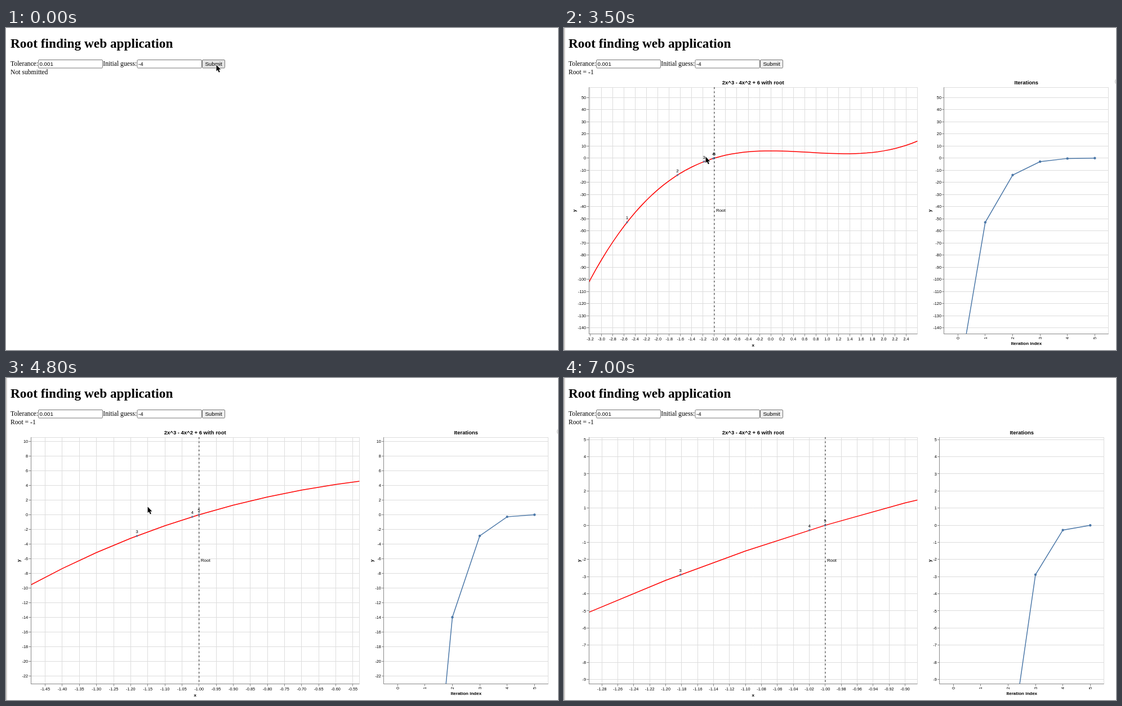
An HTML page with a canvas that plays this animation: 980x571 px, repeating every 7.2 s.

```html
<!DOCTYPE html>
<html lang="en">
<head>
<meta charset="utf-8">
<title>Root finding</title>
<style>
  html, body { margin: 0; width: 100%; height: 100%; overflow: hidden; background: #fff; }
  canvas { display: block; }
</style>
</head>
<body>
<canvas id="stage" width="980" height="571"></canvas>
<script>
const ctx = document.getElementById('stage').getContext('2d');
const LOOP = 7200, UNIT = 0.7293; // UNIT: page zoom
const SANS = '"Liberation Sans", Arial, sans-serif';
const SERIF = '"Liberation Serif", "Times New Roman", serif';
const BLUE = '#4c78a8', LABEL = 10 * UNIT;
const TOP = 105.1, HEIGHT = 437.8, BOTTOM = TOP + HEIGHT;
const LEFT = 44, WIDTH = 583.4, WIDTH2 = 291.7;
// Fixed point of the zoom: on the page and in plot units
const PIVOT = { x: 251.88, y: 228.46, px: -1.1497, py: 1.075 };

const f = x => 2 * x ** 3 - 4 * x ** 2 + 6;
const slope = x => 6 * x ** 2 - 8 * x;
const curve = Array.from({ length: 80 }, (_, i) => (i - 40) / 10).map(x => [x, f(x)]);
const guesses = [-4];
for (let i = 0; i < 5; i++) {
  const x = guesses[i];
  guesses.push(x - f(x) / slope(x));
}

// [time, wheel notches so far]
const wheel = [[3300, 1], [3400, 2], [3500, 3], [3600, 4], [4000, 6], [4100, 8], [4200, 10],
  [4300, 13], [4400, 15], [4500, 17], [4600, 18], [4700, 19], [4800, 20], [5000, 21],
  [5100, 22], [5200, 24], [5300, 25], [5700, 26], [5800, 27], [5900, 28]];
// [time, x, y]
const pointer = [[0, 373.5, 65.5], [1200, 373.5, 65.5], [1300, 360, 78], [1500, 311.8, 92.5],
  [1700, 210, 116], [1900, 100, 90], [2000, 52, 64], [2100, 46, 58], [2400, 50, 110],
  [2600, 110, 200], [2800, 175, 256], [2900, 190, 260], [3000, 225, 245],
  [3100, 251.5, 228.3], [6300, 251.5, 228.3], [6400, 190, 110], [6500, 121, 3], [6700, 121, 3]];

function text(str, x, y, size, { align = 'center', bold = false, family = SANS, turn = 0 } = {}) {
  ctx.save();
  ctx.translate(x, y);
  ctx.rotate(turn);
  ctx.font = `${bold ? 'bold ' : ''}${size}px ${family}`;
  ctx.textAlign = align;
  ctx.fillStyle = '#000';
  ctx.fillText(str, 0, size * 0.36);
  ctx.restore();
}

function path(points, color, width) {
  ctx.beginPath();
  points.forEach(([x, y]) => ctx.lineTo(x, y));
  ctx.strokeStyle = color;
  ctx.lineWidth = width;
  ctx.stroke();
}

const snap = v => Math.floor(v) + 0.5;
const hLine = (x0, x1, y, color) => path([[x0, snap(y)], [x1, snap(y)]], color, 1);
const vLine = (x, y0, y1, color) => path([[snap(x), y0], [snap(x), y1]], color, 1);

function dot(x, y, r) {
  ctx.beginPath();
  ctx.arc(x, y, r, 0, 2 * Math.PI);
  ctx.fillStyle = BLUE;
  ctx.fill();
}

function ticks(lo, hi, count) {
  const raw = (hi - lo) / count;
  const power = Math.floor(Math.log10(raw)), base = 10 ** power, err = raw / base;
  const factor = err >= Math.sqrt(50) ? 10 : err >= Math.sqrt(10) ? 5 : err >= Math.SQRT2 ? 2 : 1;
  const step = factor * base;
  const digits = Math.max(0, factor === 10 ? -power - 1 : -power);
  const list = [];
  for (let i = Math.ceil(lo / step - 1e-3); i <= hi / step + 1e-3; i++) {
    list.push({ value: i * step, label: (i === 0 ? 0 : i * step).toFixed(digits) });
  }
  return list;
}

function clipped(x, width, draw) {
  ctx.save();
  ctx.beginPath();
  ctx.rect(x, TOP, width, HEIGHT);
  ctx.clip();
  draw();
  ctx.restore();
}

function frame(x, width, yTicks, toY) {
  hLine(x, x + width, TOP, '#ddd');
  vLine(x + width, TOP, BOTTOM, '#ddd');
  yTicks.forEach(t => hLine(x, x + width, toY(t.value), '#ddd'));
}

function axes(x, width, yTicks, toY) {
  vLine(x, TOP, BOTTOM, '#888');
  hLine(x, x + width, BOTTOM, '#888');
  yTicks.forEach(t => {
    const y = toY(t.value);
    hLine(x - 3.6, x, y, '#888');
    text(t.label, x - 5, y, LABEL, { align: 'right' });
  });
}

function labelWidth(list) {
  ctx.font = `${LABEL}px ${SANS}`;
  return Math.max(...list.map(t => ctx.measureText(t.label).width));
}

const titleY = (list, toY) => Math.min(97, toY(list[list.length - 1].value) - 12);

function functionPlot(zoom) {
  const kx = WIDTH / 8 * zoom, ky = HEIGHT / 280 * zoom;
  const { px, py } = PIVOT;
  const toX = v => PIVOT.x + (v - px) * kx, toY = v => PIVOT.y - (v - py) * ky;
  const x0 = px - (PIVOT.x - LEFT) / kx, y1 = py + (PIVOT.y - TOP) / ky;
  const xTicks = ticks(x0, x0 + WIDTH / kx, 20), yTicks = ticks(y1 - HEIGHT / ky, y1, 15);

  frame(LEFT, WIDTH, yTicks, toY);
  xTicks.forEach(t => vLine(toX(t.value), TOP, BOTTOM, '#ddd'));
  const root = toX(-1);
  clipped(LEFT, WIDTH, () => {
    path(curve.map(([x, y]) => [toX(x), toY(y)]), '#f00', 1.5);
    ctx.globalAlpha = 0.75;
    guesses.forEach(x => dot(toX(x), toY(f(x)), 1.9));
    ctx.globalAlpha = 1;
    ctx.setLineDash([2.9, 4.4]);
    path([[root, TOP], [root, BOTTOM]], '#222', 1.1);
    ctx.setLineDash([]);
    guesses.forEach((x, i) => text(i, toX(x), toY(f(x)) - 8, 8));
    text('Root', root + 3, 323.5, 8, { align: 'left' });
  });
  axes(LEFT, WIDTH, yTicks, toY);
  xTicks.forEach(t => {
    const x = toX(t.value);
    const align = x - LEFT < 2 ? 'left' : LEFT + WIDTH - x < 2 ? 'right' : 'center';
    vLine(x, BOTTOM, BOTTOM + 3.6, '#888');
    text(t.label, x, 551.6, LABEL, { align });
  });
  text('x', LEFT + WIDTH / 2, 562.3, 8, { bold: true });
  text('y', LEFT - 11.4 - labelWidth(yTicks), 324, 8, { bold: true, turn: -Math.PI / 2 });
  text('2x^3 - 4x^2 + 6 with root', LEFT + WIDTH / 2, titleY(yTicks, toY), 9.48, { bold: true });
  return { toY, yTicks };
}

function iterationPlot({ toY, yTicks }, zoomed) {
  if (!zoomed) {
    toY = v => TOP - v * HEIGHT / 200;
    yTicks = ticks(-200, 0, 15);
  }
  const left = 649 + 11.4 + labelWidth(yTicks) + (zoomed ? 0 : 0.6);
  const mid = left + WIDTH2 / 2;
  const toX = i => left + WIDTH2 / 6 * (i + 0.5);
  const points = guesses.map((x, i) => [toX(i), toY(f(x))]);

  frame(left, WIDTH2, yTicks, toY);
  clipped(left, WIDTH2, () => {
    path(points, BLUE, 1.5);
    points.forEach(([x, y]) => dot(x, y, 2.2));
  });
  axes(left, WIDTH2, yTicks, toY);
  points.forEach(([x], i) => {
    vLine(x, BOTTOM, BOTTOM + 3.6, '#888');
    text(i, x, 550, LABEL, { turn: -Math.PI / 2 });
  });
  text('Iteration index', mid, 559, 8, { bold: true });
  text('y', 649, 324, 8, { bold: true, turn: -Math.PI / 2 });
  text('Iterations', mid, titleY(yTicks, toY), 9.48, { bold: true });
}

function box(x, width, fill) {
  ctx.beginPath();
  ctx.roundRect(x + 0.5, 56.5, width - 1, 14.5, 1.5);
  ctx.fillStyle = fill;
  ctx.fill();
  ctx.strokeStyle = '#767676';
  ctx.lineWidth = 1;
  ctx.stroke();
}

function page(t) {
  const serif = { align: 'left', family: SERIF }, size = 16 * UNIT;
  text('Root finding web application', 8, 26.7, 32 * UNIT, { ...serif, bold: true });
  text('Tolerance:', 8, 63, size, serif);
  text('Initial guess:', 172.3, 63, size, serif);
  text(t < 900 ? 'Not submitted' : 'Root = -1', 8, 77.5, size, serif);
  box(57, 115, '#fff');
  box(232.5, 115.5, '#fff');
  box(348, 41, t < 1300 ? '#e3e3e3' : '#efefef');
  text('0.001', 59.5, 64, 9.72, { align: 'left' });
  text('-4', 235, 64, 9.72, { align: 'left' });
  text('Submit', 368.5, 63.7, 9.72);
}

function cursor(t) {
  const i = pointer.findIndex(p => p[0] > t);
  if (i < 0) return;
  const [t0, x0, y0] = pointer[i - 1], [t1, x1, y1] = pointer[i];
  const u = (t - t0) / (t1 - t0);
  ctx.save();
  ctx.translate(x0 + (x1 - x0) * u, y0 + (y1 - y0) * u);
  const arrow = new Path2D('M0 0V11L2.4 8.8L4.4 13.2L6.3 12.3L4.3 8.1H7.8Z');
  ctx.strokeStyle = '#fff';
  ctx.lineWidth = 1.4;
  ctx.stroke(arrow);
  ctx.fillStyle = '#000';
  ctx.fill(arrow);
  ctx.restore();
}

function draw(now) {
  const t = Math.floor(now % LOOP / 100) * 100;
  ctx.fillStyle = '#fff';
  ctx.fillRect(0, 0, 980, 571);
  if (t >= 700) {
    ctx.fillStyle = '#d6d3d0';
    ctx.fillRect(0, 0, 2, 571);
  }
  page(t);
  if (t >= 900) {
    const notches = wheel.reduce((n, [at, count]) => at <= t ? count : n, 0);
    iterationPlot(functionPlot(1.001 ** (106 * notches)), notches > 0);
  }
  if (t >= 1300 && t < 6700) {
    ctx.beginPath();
    ctx.arc(984, 95, 5.5, 0, 2 * Math.PI);
    ctx.strokeStyle = '#bbb';
    ctx.lineWidth = 1;
    ctx.stroke();
  }
  cursor(t);
}

const start = performance.now();
function tick() {
  draw(performance.now() - start);
  requestAnimationFrame(tick);
}
tick();
</script>
</body>
</html>
```
